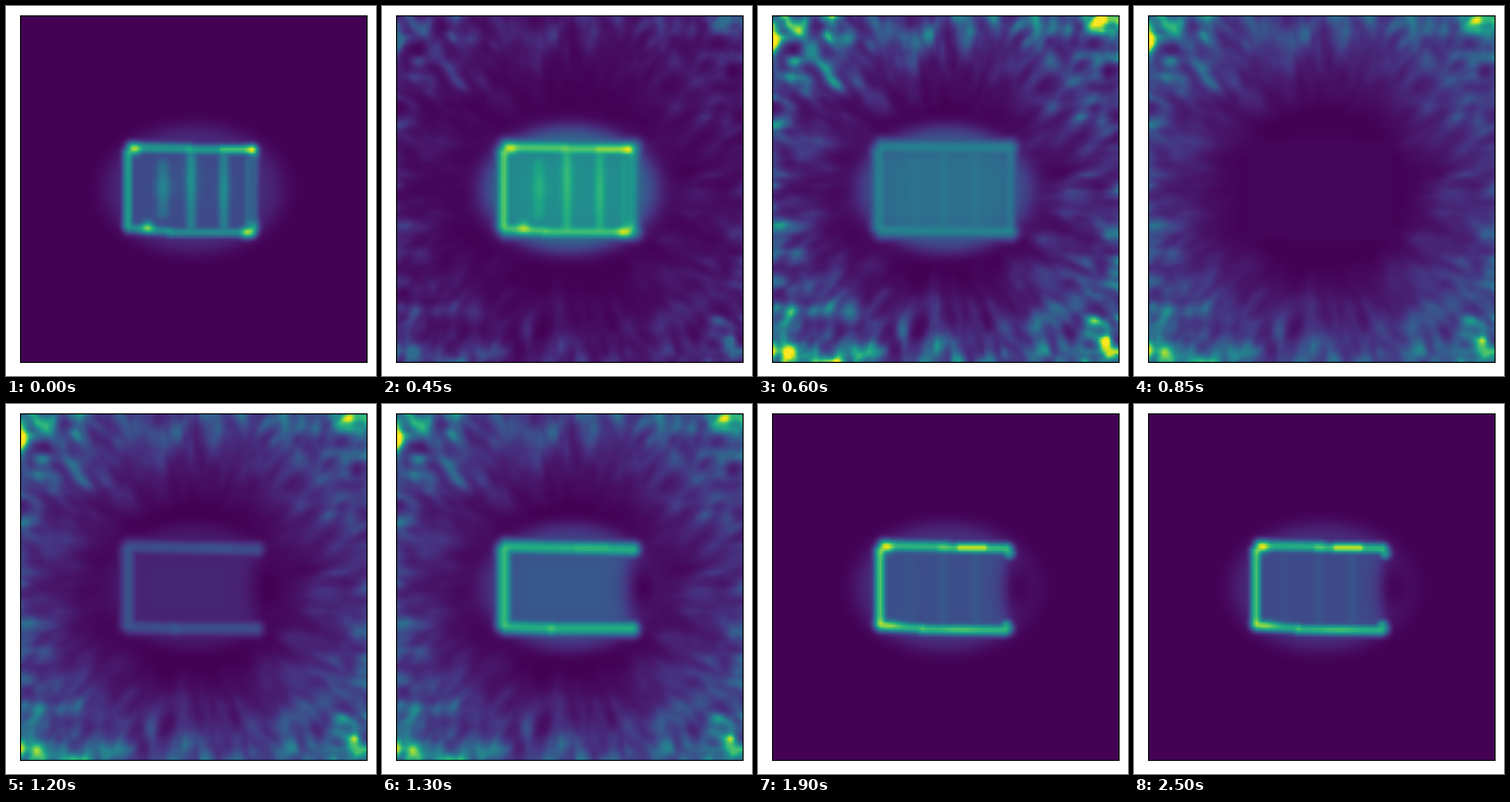
Animation, 394 px wide and 394 px high, one loop 5 s. Source, as a matplotlib script:

```python
import numpy as np
import matplotlib.pyplot as plt
from matplotlib.animation import FuncAnimation

SIZE = 394
LEFT, TOP, SIDE = 15, 10, 369
CELLS = 123
FRAMES, INTERVAL = 100, 50
SETTLED = 50

steps = (np.arange(CELLS) + 0.5) * SIDE / CELLS
X, Y = np.meshgrid(LEFT + steps, TOP + steps)


def blob(x, y, amp, sx=4.5, sy=None):
    sy = sy or sx
    return amp * np.exp(-((X - x) / sx) ** 2 / 2 - ((Y - y) / sy) ** 2 / 2)


def line(x0, y0, x1, y1, amp, width=4.6):
    dx, dy = x1 - x0, y1 - y0
    t = np.clip(((X - x0) * dx + (Y - y0) * dy) / (dx * dx + dy * dy), 0, 1)
    d2 = (X - x0 - t * dx) ** 2 + (Y - y0 - t * dy) ** 2
    return amp * np.exp(-d2 / (2 * width ** 2))


def box(x0, y0, x1, y1, amp, soft):
    def edge(v):
        return 1 / (1 + np.exp(-v / soft))
    return amp * edge(X - x0) * edge(x1 - X) * edge(Y - y0) * edge(y1 - Y)


def halo(amp):
    e = np.hypot((X - 200) / 92, (Y - 195) / 66)
    return amp / (1 + np.exp((e - 1) / 0.08))


def blend(*layers):
    """Smooth maximum, so that overlapping strokes leave no creases."""
    return sum(layer ** 5 for layer in layers) ** 0.2


def unit(field):
    return field / field.max()


def closed_sharp():
    strokes = blend(
        box(128, 149, 268, 243, 0.23, 3),
        halo(0.13),
        line(130, 157, 130, 233, 0.57),
        line(134, 151, 195, 152, 0.55, 5),
        line(195, 153, 262, 153, 0.56),
        line(230, 153, 262, 153, 0.70, 4),
        line(131, 236, 175, 240, 0.50),
        line(175, 241, 262, 241, 0.48),
        line(265, 160, 264, 236, 0.30),
        line(167, 170, 167, 220, 0.37, 8),
        line(197, 160, 197, 235, 0.44, 6),
        line(232, 160, 232, 235, 0.43, 6),
        line(258, 166, 258, 230, 0.34, 5),
    )
    spots = (blob(137, 153, 0.40) + blob(263, 154, 0.32) + blob(151, 235, 0.40)
             + blob(257, 241, 0.42) + blob(264, 235, 0.22) + blob(197, 185, 0.08, 8, 18)
             + blob(169, 193, 0.10, 7, 9) + blob(232, 197, 0.08, 5, 14))
    return unit(strokes + spots)


def closed_soft():
    return unit(blend(
        box(125, 148, 275, 243, 0.70, 5),
        halo(0.55),
        line(129, 156, 129, 234, 0.86, 7),
        line(133, 150, 268, 151, 0.86, 7),
        line(133, 239, 268, 240, 0.88, 7),
        line(269, 157, 268, 235, 0.74, 6),
        line(166, 165, 166, 227, 0.56, 8),
        line(197, 160, 197, 232, 0.62, 7),
        line(231, 162, 231, 230, 0.58, 7),
    ))


def notch():
    return 1 - blob(279, 196, 0.9, 14, 24)


def open_sharp():
    fill = blend(box(128, 149, 268, 243, 0.20, 3), halo(0.12),
                 line(160, 165, 160, 228, 0.17, 8), line(197, 165, 197, 230, 0.20, 7),
                 line(232, 165, 232, 230, 0.21, 6))
    strokes = blend(
        fill * notch(),
        line(130, 157, 130, 233, 0.64),
        line(134, 151, 200, 152, 0.57, 5),
        line(195, 153, 264, 154, 0.60),
        line(215, 153, 241, 153, 0.80, 4),
        line(266, 156, 267, 159, 0.50, 5),
        line(131, 236, 175, 239, 0.56),
        line(175, 240, 262, 241, 0.58),
        line(264, 236, 265, 239, 0.52, 5),
    )
    return unit(strokes + blob(137, 153, 0.36) + blob(139, 235, 0.22, 9, 4)
                + blob(217, 241, 0.07, 14, 4))


def open_soft():
    fill = blend(box(126, 149, 270, 243, 0.36, 5), halo(0.28))
    return unit(blend(
        fill * notch(),
        line(130, 156, 130, 234, 0.92, 6.5),
        line(133, 152, 267, 155, 0.86, 6.3),
        line(208, 153, 238, 153, 0.70, 5.5),
        line(133, 237, 180, 239, 0.86, 6.3),
        line(180, 239, 266, 239, 0.86, 6.3),
    ))


def sample(grid, u, v):
    """Bilinear lookup with u, v in grid cells."""
    top = len(grid) - 1.001
    u, v = np.clip(u, 0, top), np.clip(v, 0, top)
    i, j = u.astype(int), v.astype(int)
    a, b = u - i, v - j
    return ((1 - b) * ((1 - a) * grid[j, i] + a * grid[j, i + 1])
            + b * ((1 - a) * grid[j + 1, i] + a * grid[j + 1, i + 1]))


def streaks(seed):
    """Noise smeared along the radius, more so near the centre."""
    grid = np.random.default_rng(seed).normal(size=(64, 64))
    for axis in (0, 1):
        grid = 0.6 * grid + 0.2 * (np.roll(grid, 1, axis) + np.roll(grid, -1, axis))
    dx, dy = X - 200, Y - 195
    r = np.hypot(dx, dy) + 1e-6
    reach = np.clip(2.4 - (r - 110) / 65, 0.3, 2.4)
    u, v = (X - LEFT) * 63 / SIDE, (Y - TOP) * 63 / SIDE
    total = sum(sample(grid, u + k * reach * dx / r, v + k * reach * dy / r)
                for k in np.linspace(-1, 1, 9))
    return total / total.std()


radius = np.hypot(0.93 * (X - 200), Y - 195)
envelope = 0.36 * (np.clip(radius - 78, 0, None) / 172) ** 1.2
GRAIN = streaks(4)
HOT = (blob(15, 38, 1.1, 5, 9) + blob(15, 365, 0.6, 5, 8) + blob(40, 18, 0.28, 7, 5)
       + blob(40, 378, 0.35, 5, 6) + blob(70, 378, 0.25, 5, 5) + blob(378, 20, 0.15, 14)
       + blob(300, 365, 0.15, 9) + blob(370, 370, 0.12, 16))
EARLY = blob(95, 35, 0.40, 6) + blob(55, 50, 0.30, 7) + blob(97, 325, 0.25, 7)

CLOSED = closed_sharp(), closed_soft()
OPEN = open_sharp(), open_soft()


def noise(i):
    rough = np.clip((17 - i) / 5, 0, 1)
    grain = np.exp((0.28 + 0.14 * rough) * GRAIN)
    return np.clip(envelope * grain + HOT + rough * EARLY, 0, 1)


def field(i):
    i = min(i, SETTLED)
    gain = min(2.2 * 1.85 ** (i - 12), 1.4 * 1.6 ** (26 - i))
    if i <= 17:
        (sharp, soft), mix = CLOSED, min((i / 12) ** 3, 1)
    else:
        (sharp, soft), mix = OPEN, min(np.exp((26 - i) / 5), 1)
    shape = (1 - mix) * sharp + mix * soft
    total = shape + max(gain, 0.004) * noise(i)
    return unit(total - total.min())


fig = plt.figure(figsize=(SIZE / 100, SIZE / 100), dpi=100, facecolor="white")
ax = fig.add_axes([LEFT / SIZE, 1 - (TOP + SIDE) / SIZE, SIDE / SIZE, SIDE / SIZE])
ax.set_xticks([])
ax.set_yticks([])
image = ax.imshow(field(0), cmap="viridis", vmin=0, vmax=1,
                  interpolation="bilinear", aspect="auto")


def update(i):
    image.set_data(field(i))
    return [image]


anim = FuncAnimation(fig, update, frames=FRAMES, interval=INTERVAL,
                     repeat=True, repeat_delay=0, blit=False)
plt.show()
```
